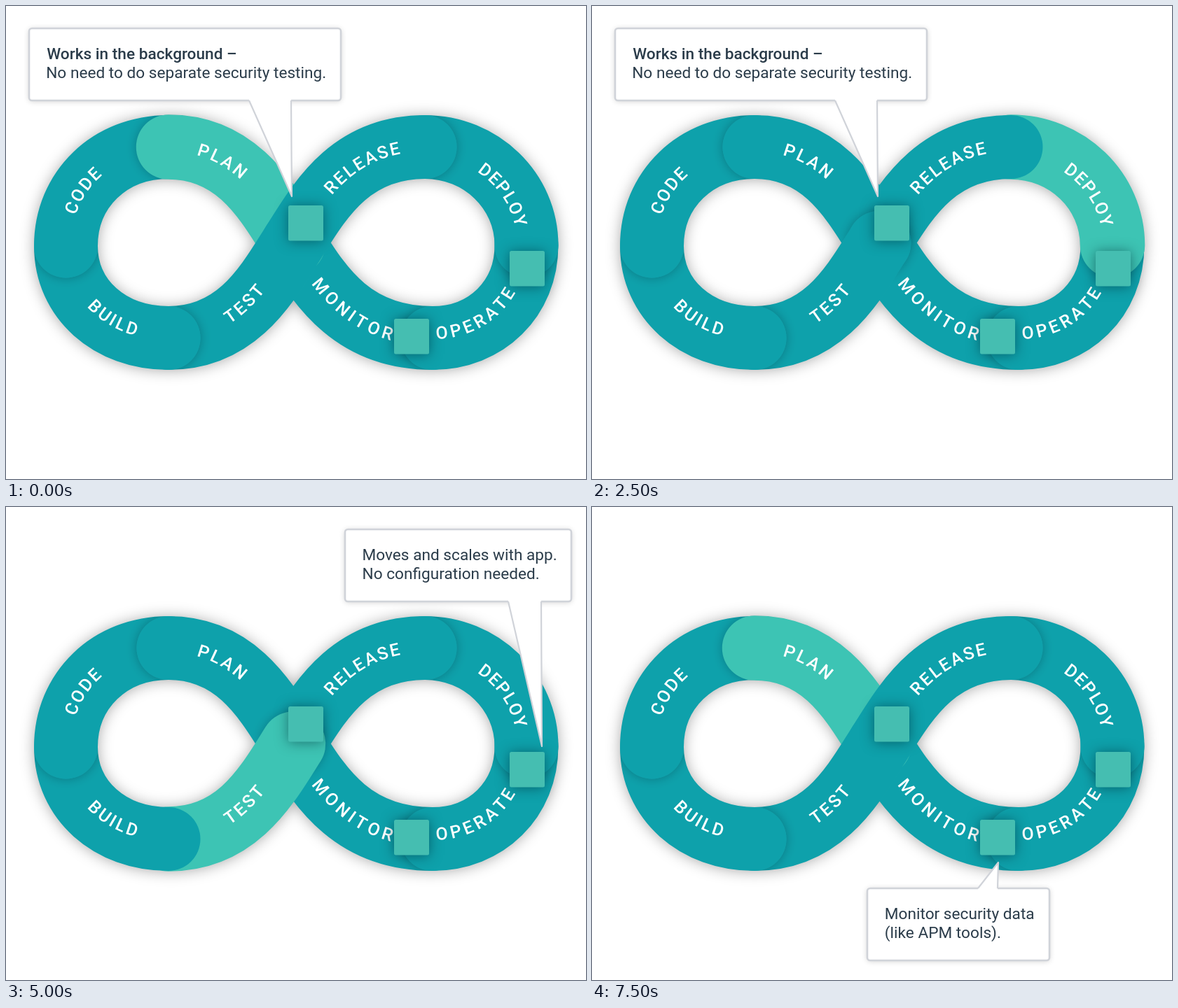
Animation of 828x676 px, one loop 8 s. Source, as an HTML page with a canvas:

```html
<!DOCTYPE html>
<html lang="en">
<head>
<meta charset="utf-8">
<title>DevOps loop</title>
<style>
  html, body { margin: 0; width: 100%; height: 100%; overflow: hidden; background: #fff; }
  canvas { display: block; }
</style>
</head>
<body>
<canvas id="stage" width="828" height="676"></canvas>
<script>
const W = 828, H = 676, STEP = 500, LOOP = 8000;
const TEAL = '#0ea1ab', MINT = '#3dc4b4', INK = '#2b3c4a';
const BAND = 91;
const LABEL_FONT = '500 25px Roboto, sans-serif';

const ctx = document.getElementById('stage').getContext('2d');
const layer = document.createElement('canvas');
layer.width = W;
layer.height = H;
const band = layer.getContext('2d');

// centre line, its end, label centre, label runs along (1) or against (-1) the line, letter spacing
const stages = {
  PLAN:    { d: 'M410 338.5C373 280 331 201.5 232 201.5', end: [232, 201.5], mid: [310, 219], dir: -1, gap: 4 },
  CODE:    { d: 'M232 201.5C148 201.5 85.5 262 85.5 343', end: [85.5, 343], mid: [107, 263], dir: -1, gap: 3 },
  BUILD:   { d: 'M85.5 343C85.5 419 148 474.5 232 474.5', end: [232, 474.5], mid: [152, 448], dir: 1, gap: 3 },
  TEST:    { d: 'M232 474.5C331 474.5 373 397 410 338.5', end: [410, 338.5], mid: [340.5, 426], dir: 1, gap: 3 },
  RELEASE: { d: 'M410 338.5C447 280 490 201.5 598 201.5', end: [598, 201.5], mid: [504.5, 224.5], dir: 1, gap: 3 },
  DEPLOY:  { d: 'M598 201.5C678 201.5 743 264 743 342', end: [743, 342], mid: [715, 266], dir: 1, gap: 3 },
  OPERATE: { d: 'M743 342C743 418 686 474.5 609 474.5', end: [609, 474.5], mid: [675.5, 450], dir: -1, gap: 4.5 },
  MONITOR: { d: 'M609 474.5C492 474.5 447 397 410 338.5', end: [410, 338.5], mid: [490.5, 440], dir: -1, gap: 4 }
};
const names = Object.keys(stages);

// stacking from the bottom up, with the stages each end cap shades
const shades = {
  MONITOR: ['PLAN'],
  PLAN: ['CODE'],
  OPERATE: ['MONITOR'],
  DEPLOY: ['OPERATE'],
  RELEASE: ['DEPLOY'],
  TEST: ['RELEASE', 'PLAN'],
  BUILD: ['TEST'],
  CODE: ['BUILD']
};
const badges = [[403, 285], [719, 350], [554, 447]];

const callouts = [
  { box: [33, 32, 445, 103], tail: [[347, 135], [408, 272], [407, 135]], text: [57.2, 76],
    lines: ['Works in the background –', 'No need to do separate security testing.'], bold: true },
  { box: [484, 32, 323, 103], tail: [[717, 135], [765, 342], [764, 135]], text: [508.5, 76],
    lines: ['Moves and scales with app.', 'No configuration needed.'] },
  { box: [393, 545, 260, 103], tail: [[551, 545], [580, 508], [579, 545]], text: [417.8, 589],
    lines: ['Monitor security data', '(like APM tools).'] }
];

function shadow(c, color, blur, y = 0) {
  c.shadowColor = color;
  c.shadowBlur = blur;
  c.shadowOffsetY = y;
}

// Places each letter of a label on its centre line.
function layoutLabel(name) {
  const { d, mid: [cx, cy], dir, gap } = stages[name];
  const path = document.createElementNS('http://www.w3.org/2000/svg', 'path');
  path.setAttribute('d', d);
  const total = path.getTotalLength();
  const at = s => {
    const p = path.getPointAtLength(s);
    const a = path.getPointAtLength(Math.max(0, s - 1));
    const b = path.getPointAtLength(Math.min(total, s + 1));
    return { x: p.x, y: p.y, angle: Math.atan2((b.y - a.y) * dir, (b.x - a.x) * dir) };
  };
  let near = 0, best = Infinity;
  for (let s = 0; s <= total; s += 0.5) {
    const p = path.getPointAtLength(s);
    const dist = Math.hypot(p.x - cx, p.y - cy);
    if (dist < best) { best = dist; near = s; }
  }
  const m = at(near);
  const drop = (cy - m.y) * Math.cos(m.angle) - (cx - m.x) * Math.sin(m.angle);

  ctx.font = LABEL_FONT;
  const letters = [...name];
  const widths = letters.map(ch => ctx.measureText(ch).width);
  let pos = -(widths.reduce((a, b) => a + b, 0) + gap * (letters.length - 1)) / 2;
  return letters.map((ch, i) => {
    const p = at(near + dir * (pos + widths[i] / 2));
    pos += widths[i] + gap;
    return { ch, drop, ...p };
  });
}

function strokeStage(name, active) {
  const lit = name === active;
  band.strokeStyle = lit ? MINT : TEAL;
  band.lineWidth = lit ? BAND + 1.5 : BAND;
  band.stroke(stages[name].line);
}

// A lit stage stays free of shade.
function shadeBelow(name, active) {
  if (shades[name].includes(active)) return;
  band.save();
  shadow(band, 'rgba(0,45,55,.36)', 15);
  band.fillStyle = TEAL;
  band.beginPath();
  band.arc(...stages[name].end, BAND / 2, 0, Math.PI * 2);
  band.fill();
  band.restore();
}

function drawBand(active) {
  band.clearRect(0, 0, W, H);
  band.lineCap = 'round';
  names.forEach(n => strokeStage(n, active));

  band.save();
  band.globalCompositeOperation = 'source-atop';
  for (const name of Object.keys(shades)) {
    shadeBelow(name, active);
    strokeStage(name, active);
  }
  // PLAN passes under the crossing but over CODE
  band.beginPath();
  band.rect(0, 0, 300, 320);
  band.clip();
  shadeBelow('PLAN', active);
  strokeStage('PLAN', active);
  band.restore();

  ctx.save();
  shadow(ctx, 'rgba(0,0,0,.33)', 20, 1);
  ctx.drawImage(layer, 0, 0);
  ctx.restore();
}

function drawLabels() {
  ctx.font = LABEL_FONT;
  ctx.fillStyle = '#fff';
  ctx.textAlign = 'center';
  for (const name of names) {
    for (const g of stages[name].letters) {
      ctx.save();
      ctx.translate(g.x, g.y);
      ctx.rotate(g.angle);
      ctx.fillText(g.ch, 0, g.drop + 8.9);
      ctx.restore();
    }
  }
}

function drawBadges() {
  ctx.save();
  shadow(ctx, 'rgba(0,35,45,.5)', 18, 1);
  ctx.fillStyle = '#45beb1';
  for (const [x, y] of badges) {
    ctx.beginPath();
    ctx.roundRect(x, y, 50, 50.5, 2.5);
    ctx.fill();
  }
  ctx.restore();
}

function drawCallout({ box, tail, text, lines, bold }) {
  const [a, tip, b] = tail;
  const inward = tip[1] > a[1] ? -3 : 3;
  ctx.save();
  ctx.fillStyle = '#fff';
  ctx.strokeStyle = '#d0d3d9';
  ctx.lineWidth = 2.6;
  ctx.lineJoin = 'round';
  ctx.beginPath();
  ctx.roundRect(...box, 4);
  shadow(ctx, 'rgba(0,0,0,.2)', 8, 1);
  ctx.fill();
  shadow(ctx, 'transparent', 0);
  ctx.stroke();

  ctx.beginPath();
  ctx.moveTo(a[0], a[1] + inward);
  tail.forEach(p => ctx.lineTo(...p));
  ctx.lineTo(b[0], b[1] + inward);
  ctx.fill();
  ctx.beginPath();
  tail.forEach(p => ctx.lineTo(...p));
  ctx.lineWidth = 2.2;
  ctx.stroke();

  ctx.fillStyle = INK;
  ctx.textAlign = 'left';
  lines.forEach((line, i) => {
    ctx.font = `${bold && i === 0 ? 500 : 400} 22.65px Roboto, sans-serif`;
    ctx.fillText(line, text[0] + (bold && i === 0 ? 1 : 0), text[1] + i * 27);
  });
  ctx.restore();
}

function render(t) {
  const step = Math.floor(t / STEP);
  // the second round skips PLAN, which comes back at its end
  const active = names[step < 8 ? step : (step - 7) % 8];
  const note = step < 8 ? 0 : step < 15 ? 1 : 2;
  ctx.fillStyle = '#fff';
  ctx.fillRect(0, 0, W, H);
  drawBand(active);
  drawLabels();
  drawBadges();
  drawCallout(callouts[note]);
}

for (const name of names) {
  stages[name].line = new Path2D(stages[name].d);
  stages[name].letters = layoutLabel(name);
}

const start = performance.now();
function tick() {
  render((performance.now() - start) % LOOP);
  requestAnimationFrame(tick);
}
tick();
</script>
</body>
</html>
```
